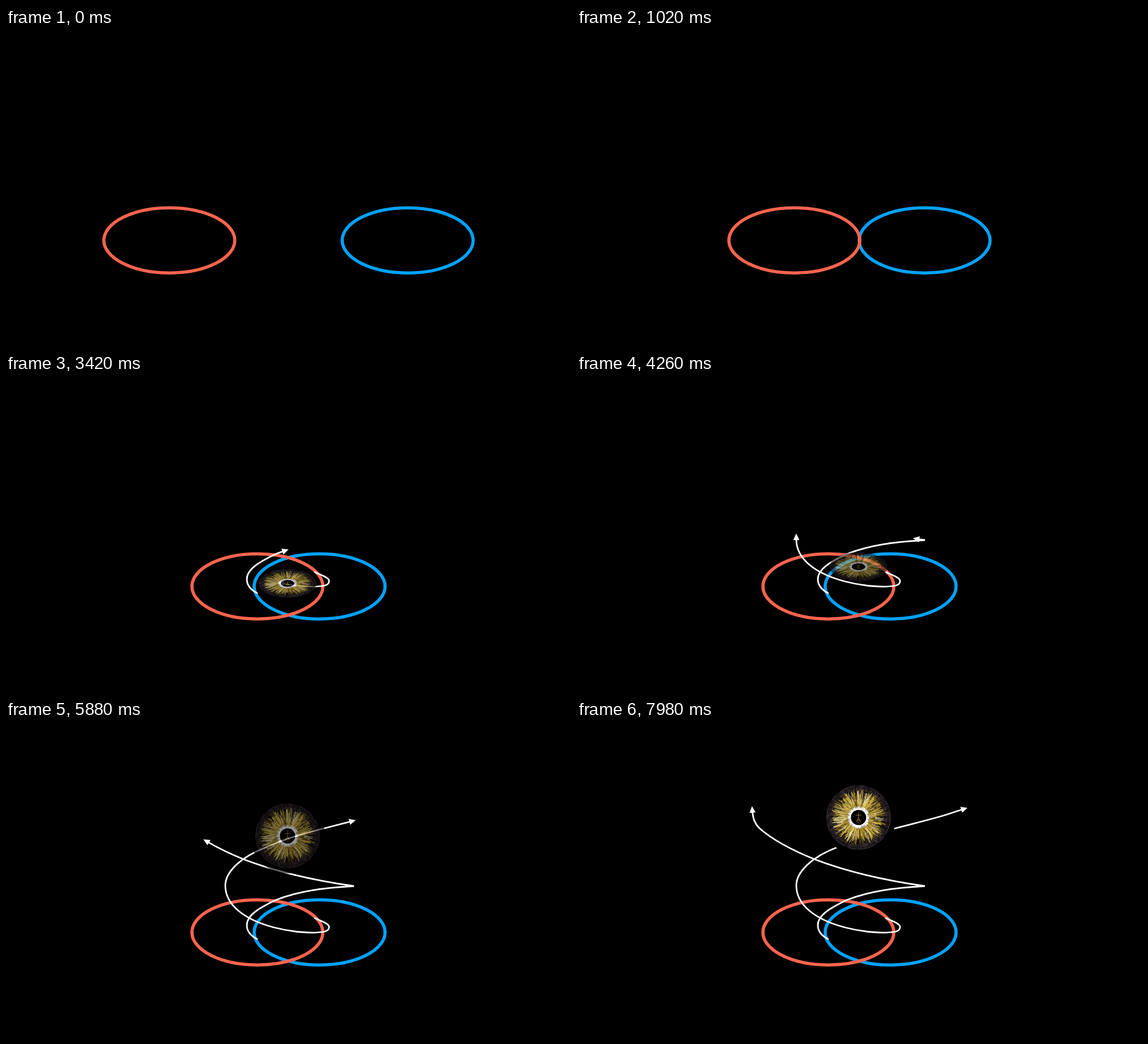
Recreate the animation shown at these times as an HTML page. Size 997 px wide and 561 px high, loop 8000 ms.

```html
<!DOCTYPE html>
<html lang="en">
<head>
<meta charset="utf-8">
<title>Overlapping ellipses and rising iris</title>
<style>
  html, body { margin: 0; width: 100%; height: 100%; overflow: hidden; background: #000; }
  svg { display: block; width: 100vw; height: 100vh; }
  path, ellipse { fill: none; }
</style>
</head>
<body>
<svg viewBox="0 0 997 561">
  <defs>
    <radialGradient id="tissue" gradientUnits="userSpaceOnUse" cx="0" cy="0" r="57">
      <stop offset=".24" stop-color="#000"/>
      <stop offset=".25" stop-color="#d8d5cc"/>
      <stop offset=".32" stop-color="#a89f84"/>
      <stop offset=".37" stop-color="#8d7426"/>
      <stop offset=".66" stop-color="#705c20"/>
      <stop offset=".82" stop-color="#352b1b"/>
      <stop offset=".9" stop-color="#211b1f"/>
      <stop offset="1" stop-color="#151116"/>
    </radialGradient>
  </defs>
  <g stroke-width="5.6">
    <ellipse id="blue" cy="374.7" rx="115.5" ry="57.5" stroke="#00a2ff"/>
    <ellipse id="red" cy="374.7" rx="115.5" ry="57.5" stroke="#ff644e"/>
  </g>
  <g id="arrows" stroke="#fff" stroke-width="2.8">
    <path d="M444 387C432 381 425 373 425 362C425 344 448 331 475 318C515 302 560 296 614 293C550 284 478 268 420 246C385 232 347 213 322 191C313 182 309 172 309.5 152"/>
    <path d="M544 349C554 354 562 356 568 361C572 365 570 371 563 373C540 378 500 373 473 366C420 352 387 326 387 292C387 268 414 242 458 225C490 210 525 200 562 191C600 181 630 174 655 166C667 162 676 159 689 155"/>
  </g>
  <g id="iris">
    <circle id="halo"/>
    <circle r="57" fill="url(#tissue)"/>
    <g id="fibres"></g>
    <circle r="13" fill="#000"/>
    <path d="M0-9V1M-5-4H5M0 1L-4 8M0 1L4 8M-3 5H3M-2 9H2" stroke="#8c7020" stroke-width="1.2"/>
  </g>
</svg>
<script>
const LOOP = 8000, STEP = 30, HEAD = 11.5;
const svgNS = 'http://www.w3.org/2000/svg';
const byId = id => document.getElementById(id);
const clamp = x => Math.min(1, Math.max(0, x));
const mix = (a, b, k) => a + (b - a) * k;
const sineEase = x => (1 - Math.cos(Math.PI * clamp(x))) / 2;

function add(parent, tag, attributes) {
  const node = parent.appendChild(document.createElementNS(svgNS, tag));
  for (const name in attributes) node.setAttribute(name, attributes[name]);
  return node;
}

// Ease-in-out as the Bezier curve (.42, 0, .58, 1)
function bezierEase(x) {
  let low = 0, high = 1, s = .5;
  for (let i = 0; i < 24; i++) {
    s = (low + high) / 2;
    const u = 1 - s;
    if (1.26 * s * u * u + 1.74 * s * s * u + s ** 3 < x) low = s; else high = s;
  }
  return s * s * (3 - 2 * s);
}

function track(keys, t) {
  const i = keys.findIndex(([time]) => time > t);
  if (i === 0) return keys[0][1];
  if (i < 0) return keys[keys.length - 1][1];
  const [t0, a] = keys[i - 1], [t1, b] = keys[i];
  return mix(a, b, (t - t0) / (t1 - t0));
}

let seed = 7;
const random = (a = 0, b = 1) => {
  seed = (seed * 16807) % 2147483647;
  return mix(a, b, seed / 2147483647);
};

// One path of slightly crooked radial fibres
function fibres(count, color, width, inner, outer) {
  let d = '';
  const at = (r, angle) => `${(r * Math.cos(angle)).toFixed(1)} ${(r * Math.sin(angle)).toFixed(1)}`;
  for (let i = 0; i < count; i++) {
    const angle = random(0, Math.PI * 2), r0 = random(...inner), r1 = random(...outer);
    const bend = () => angle + random(-.05, .05);
    d += `M${at(r0, angle)}L${at((r0 + r1) / 2, bend())}L${at(r1, bend())}`;
  }
  add(byId('fibres'), 'path', { d, stroke: color, 'stroke-width': width });
}

fibres(110, '#0d0908', 1.3, [24, 42], [46, 57]);
fibres(130, '#c5a537', 1.1, [18, 28], [32, 50]);
fibres(50, '#32290f', 1, [20, 32], [36, 50]);
fibres(55, '#e9d57c', .9, [17, 24], [28, 48]);
fibres(28, '#f2ecd2', .8, [22, 34], [36, 50]);
fibres(60, '#4b4148', .7, [46, 52], [51, 57]);
fibres(100, '#fff', 1.1, [13, 15], [16, 20]);
const ring = (r, stroke, width, dash) => add(byId('fibres'), 'circle',
  { r, fill: 'none', stroke, 'stroke-width': width, 'stroke-dasharray': dash });
ring(14.5, '#fff', 1.8, '14 1');
ring(31, '#e6dfb888', .9, '5 3 9 4');
ring(49, '#6b605f99', .8, '9 5 3 7');
ring(56, '#4a424a', .8, '30 6 12 9');

const arrows = [...byId('arrows').querySelectorAll('path')].map(path => ({
  path,
  length: path.getTotalLength(),
  head: add(byId('arrows'), 'polygon', { fill: '#fff', stroke: 'none' })
}));

function drawArrow({ path, length, head }, progress) {
  const tip = progress * length, size = Math.min(HEAD, tip), base = tip - size;
  path.setAttribute('stroke-dasharray', `${base + size * .3} ${length * 2}`);
  path.style.display = head.style.display = progress > 0 ? '' : 'none';
  const p = path.getPointAtLength(base);
  const a = path.getPointAtLength(Math.max(0, base - 1));
  const b = path.getPointAtLength(base + 1);
  const angle = Math.atan2(b.y - a.y, b.x - a.x) * 180 / Math.PI;
  head.setAttribute('points', `0,${-size * .47} ${size},0 0,${size * .47}`);
  head.setAttribute('transform', `translate(${p.x} ${p.y}) rotate(${angle})`);
}

const irisHeight = [[2400, 375], [3240, 371], [3700, 367], [4050, 358], [4260, 340], [4860, 274],
  [5670, 216], [5880, 204.5], [6480, 186], [6870, 180], [7290, 174], [7980, 172]];
const irisAlpha = [[1800, 0], [2300, 1], [2450, 1], [4260, .6], [5880, .6], [6870, .9], [7700, 1]];

function draw(t) {
  const approach = bezierEase(clamp(t / 1800));
  byId('red').setAttribute('cx', mix(288.2, 443.6, approach));
  byId('blue').setAttribute('cx', mix(708.8, 553.4, approach));

  const progress = sineEase((t - 1800) / 5300);
  for (const arrow of arrows) drawArrow(arrow, progress);

  const open = sineEase((t - 4200) / 850);
  byId('iris').setAttribute('opacity', track(irisAlpha, t));
  byId('iris').setAttribute('transform',
    `translate(496.8 ${track(irisHeight, t)}) scale(${mix(.89, 1, open)} ${mix(.44, 1, open)})`);
  byId('halo').setAttribute('r', mix(57, 66, open));
}

function frame() {
  const t = performance.now() % LOOP;
  draw(t - t % STEP);
  requestAnimationFrame(frame);
}
frame();
</script>
</body>
</html>
```
